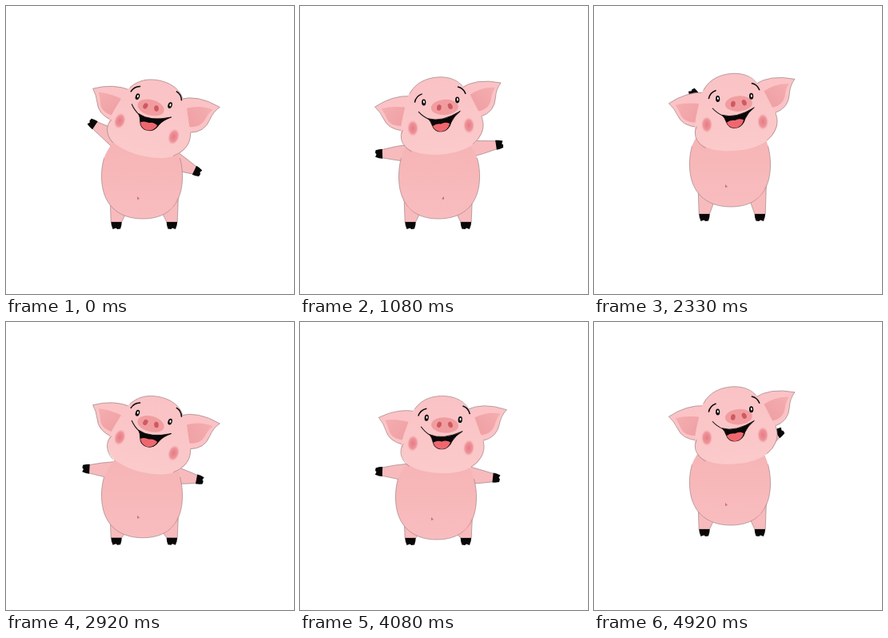
Write an HTML page with a canvas that moves like this. It is 360x360 px and loops after 5000 ms.

```html
<!DOCTYPE html>
<html lang="en">
<head>
<meta charset="utf-8">
<title>Dancing pig</title>
<style>
html, body { margin: 0; width: 100%; height: 100%; overflow: hidden; background: #fff; }
canvas { display: block; width: 100vmin; height: 100vmin; }
</style>
</head>
<body>
<canvas width="360" height="360"></canvas>
<script>
const canvas = document.querySelector('canvas');
const ctx = canvas.getContext('2d');
const LOOP = 5000, FRAMES = 60;
const INK = '#090708', EDGE = '#a08688', SKIN = '#f8bbbd';

// tilt, head dy, body dy, feet dy, left hand x y, right hand x y, mirrored body
const POSES = {
  waveLeft:  [12.3, 1, 0, 0, 108, 147, 239, 207, 0],
  middle:    [0, 0, 0, 0, 99, 166, 246, 200, 0],
  waveRight: [-7, -1.5, 0, 0, 99, 185, 249, 173, 1],
  crouch:    [0.5, 2, 6, 0, 99, 187, 245, 195, 0],
  leanRight: [12.3, 2, 4, 0, 99, 187, 243, 200, 0],
  leanLeft:  [-7, 0, 4, 0, 99, 187, 247, 182, 0],
  leap:      [-7, -11, -10, -8, 122, 118, 228, 134, 0],
  landing:   [-7, -6, -15, -10, 124, 109, 218, 140, 0],
  cheer:     [12.3, -8, -1, -4, 127, 118, 222, 142, 0],
  rise:      [-7, -9.5, -12, -11, 122, 130, 232, 138, 0]
};
const DANCE = [
  [0, 'waveLeft'], [4.2, 'waveRight'], [8.4, 'waveLeft'], [12.8, 'waveRight'],
  [16.8, 'waveLeft'], [19, 'middle'], [21, 'waveRight'], [25, 'leap'],
  [28, 'landing'], [34, 'leanRight'], [41, 'cheer'], [49, 'crouch'],
  [54, 'leanLeft'], [56, 'leanLeft'], [59, 'rise']
];

function poseAt(frame) {
  const next = Math.max(1, DANCE.findIndex(([at]) => at >= frame));
  const [t0, from] = DANCE[next - 1], [t1, to] = DANCE[next];
  const ease = (1 - Math.cos(Math.PI * (frame - t0) / (t1 - t0))) / 2;
  return POSES[from].map((v, i) => v + (POSES[to][i] - v) * ease);
}

function shape(d, fill, stroke, width = 0.7) {
  const path = new Path2D(d);
  if (fill) { ctx.fillStyle = fill; ctx.fill(path); }
  if (stroke) { ctx.strokeStyle = stroke; ctx.lineWidth = width; ctx.stroke(path); }
}

function oval(x, y, rx, ry, fill, angle = 0) {
  ctx.beginPath();
  ctx.ellipse(x, y, rx, ry, angle, 0, 2 * Math.PI);
  ctx.fillStyle = fill;
  ctx.fill();
}

function at(x, y, angle, draw) {
  ctx.save();
  ctx.translate(x, y);
  ctx.rotate(angle);
  draw();
  ctx.restore();
}

function gradient(x0, y0, x1, y1, a, b) {
  const g = ctx.createLinearGradient(x0, y0, x1, y1);
  g.addColorStop(0, a);
  g.addColorStop(1, b);
  return g;
}

function hoof() {
  shape('M-4-6Q0-6 5-4L3.5-0.5L5 1L4.5 4.5Q0 6-4 6Z', INK);
}

// side is -1 for the left limb, 1 for the right one
function arm(side, hx, hy, bodyDy) {
  const lift = 187 - hy;
  const sx = 172 + side * (36 - lift * 0.12);
  const sy = 185 - lift * 0.4 + bodyDy * 0.5;
  const length = Math.hypot(hx - sx, hy - sy);
  at(hx, hy, Math.atan2(hy - sy, hx - sx), () => {
    shape(`M-3-5Q${-length / 2}-8 ${-length}-11V11Q${-length / 2} 9-3 5Z`, SKIN, EDGE);
    hoof();
  });
}

function leg(side, bodyDy, feetDy) {
  at(172.7 + side * 34.7, 0, 0, () => {
    ctx.scale(side, 1);
    const foot = 270 + feetDy;
    shape(`M8 ${238 + bodyDy}L6.8 ${foot}H-6.5L-13 ${257 + bodyDy}`, SKIN, EDGE);
    at(0, foot + 4, Math.PI / 2, () => {
      ctx.scale(1, 1.12);
      hoof();
    });
  });
}

function body(dy, mirrored) {
  ctx.save();
  ctx.translate(mirrored ? 344 : 0, dy);
  ctx.scale(mirrored ? -1 : 1, 1);
  const belly = '122.5 190C120 199 119.2 208 119.5 215C120 246 138 266 171 266C205 266 220 245 220.5 215C220.5 207 220 199 217.5 190';
  shape(`M142 150L134 171Q126 180 ${belly}Q215 180 209 171L202 150Z`, gradient(0, 175, 0, 266, '#f6b4b6', '#f9bdbf'));
  shape('M' + belly, null, EDGE);
  shape('M196 261Q211 253 215 238Q213 253 196 261', '#efa3a8');
  shape('M164 238L167 241L164 242Z', '#c96f74');
  ctx.restore();
}

function cheek(x, y) {
  at(x, y, 0.1, () => {
    ctx.scale(0.68, 1);
    const g = ctx.createRadialGradient(0, 0, 1, 0, 0, 11);
    g.addColorStop(0, '#e87d86');
    g.addColorStop(0.6, '#ee959c');
    g.addColorStop(1, '#fbc6c800');
    oval(0, 0, 11, 11, g);
  });
}

function eye(x, y) {
  oval(x, y, 2.6, 4, INK, 0.1);
  oval(x + 0.3, y - 0.5, 1, 1.8, '#fff');
}

function head(tilt, dy) {
  // Each feature slides a little with the tilt, as on a turning head.
  const layer = (slideX, slideY, draw) =>
    at(176 + slideX * tilt, 152 + dy + slideY * tilt, tilt * Math.PI / 180, () => {
      ctx.translate(-176, -152);
      draw();
    });

  layer(0.13, 0, () => {
    shape('M144 110Q122 106 98 118Q104 125 107 134Q111 148 130 152Z', '#fbc3c5', EDGE);
    shape('M106 121Q122 119 139 124L131 146Q114 145 111 134Q109 127 106 121Z', gradient(108, 120, 134, 144, '#f4adb0', '#efa0a3'));
    shape('M207 108Q227 97 258 107Q251 114 249 125Q246 142 228 146Z', '#fbc3c5', EDGE);
    shape('M218 117Q234 109 250 112Q245 118 243 127Q239 138 226 139Z', gradient(248, 112, 222, 136, '#f4adb0', '#efa0a3'));
    shape('M138 114C149 94 165 90 180 90.5C198 91 210 101 214 116C219 130 230 138 230 154C230 174 210 187 179 187C149 187 126 177 126 160C126 143 134 130 138 114Z',
      gradient(0, 90, 0, 187, '#fac2c5', '#fbcaca'));
    shape('M143 107C152 94 166 90 180 90.5C195 91 206 98 210 106', null, EDGE);
    shape('M129 151Q125 157 126 163Q128 173 137 179M229 146Q232 158 226 167Q222 174 214 179', null, EDGE);
  });
  layer(0, 0, () => {
    cheek(141, 150);
    cheek(211, 155);
  });
  layer(0, -0.35, () => shape('M147.5 116Q150 108 158 106.5M203 103Q210 105 212 113', null, INK, 1.5));
  layer(-0.1, -0.22, () => {
    eye(158, 118);
    eye(200, 120);
  });
  layer(0.05, -0.22, () => {
    shape('M151 129Q156 136 163 140', null, INK, 1);
    shape('M162 139Q178 146 203 134.5Q194 140 190 147Q186 157 177 157Q168 157 166 148Q165 143 162 139Z', INK, INK, 0.8);
    shape('M166.5 149Q171 146 177 147.5Q183 145 188 148.5Q185 156.5 177 157Q169 156.5 166.5 149Z', '#ef676e');
  });
  layer(-0.42, -0.22, () => {
    oval(181, 127, 17, 9.7, '#f19da0', 0.05);
    oval(174, 126.5, 2.8, 3.8, '#cf5963', 0.3);
    oval(188, 126.5, 2.8, 3.8, '#cf5963', -0.3);
  });
}

function draw() {
  const time = performance.now() % LOOP;
  const frame = Math.floor((time + 5) * FRAMES / LOOP) % FRAMES;
  const [tilt, headDy, bodyDy, feetDy, lx, ly, rx, ry, mirror] = poseAt(frame);

  ctx.fillStyle = '#fff';
  ctx.fillRect(0, 0, 360, 360);
  arm(-1, lx, ly, bodyDy);
  arm(1, rx, ry, bodyDy);
  leg(-1, bodyDy, feetDy);
  leg(1, bodyDy, feetDy);
  body(bodyDy, mirror > 0.5);
  head(tilt, headDy);
  requestAnimationFrame(draw);
}
draw();
</script>
</body>
</html>
```
